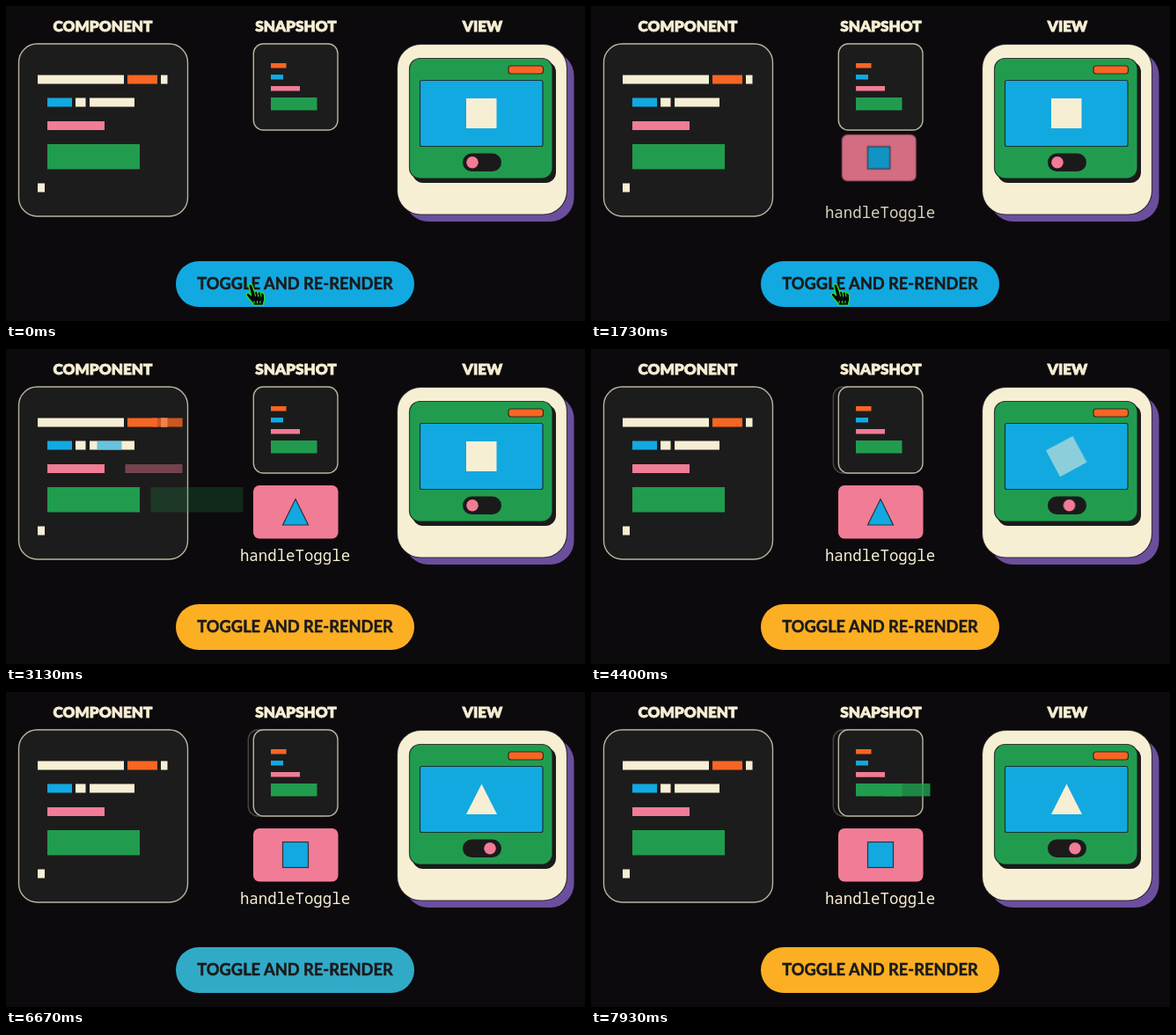
An HTML page for the animation above (8000 ms loop, 658x358 px).

```html
<!DOCTYPE html>
<html lang="en">
<head>
<meta charset="utf-8">
<title>Toggle and re-render</title>
<style>
  html, body { margin: 0; width: 100%; height: 100%; overflow: hidden; background: #0d0a0d; }
  svg { display: block; width: 658px; height: 358px; }
  svg * { transform-box: fill-box; transform-origin: center; }
  .cream { fill: #f7efd4; }
  .orange { fill: #f86624; }
  .blue { fill: #12a9e1; }
  .pink { fill: #f17c95; }
  .green { fill: #219c4e; }
  .purple { fill: #6b4f9e; }
  .dark { fill: #1b1a1b; }
  .card { fill: #1d1c1c; stroke: #b9b49f; stroke-width: 1.4; }
  .edge { stroke: #1b1a1b; stroke-opacity: .8; stroke-width: 1.2; }
  .head { font: 900 17.1px Lato, sans-serif; text-anchor: middle; stroke: #f7efd4; stroke-width: .8; }
  .label { font: 700 18.3px Lato, sans-serif; text-anchor: middle; stroke: #1b1a1b; stroke-width: .5; }
  .code { font: 17.4px "Noto Sans Mono", monospace; text-anchor: middle; }
  .cursor { fill: #050505; stroke: #2bdc35; stroke-width: 1.4; stroke-linejoin: round; }
</style>
</head>
<body>
<svg viewBox="0 0 658 358">
  <g class="head cream">
    <text x="110" y="29">COMPONENT</text>
    <text x="329.5" y="29">SNAPSHOT</text>
    <text x="541.5" y="29">VIEW</text>
  </g>

  <rect class="card" x="14.5" y="43" width="192" height="196" rx="21"/>
  <g id="code"></g>
  <rect id="flash" class="purple" x="14" y="42.500" width="193" height="197" rx="21"/>
  <g id="codeFly"></g>

  <g id="handler">
    <rect class="pink" x="281" y="155" width="96.500" height="60.500" rx="7"/>
    <rect id="stateSquare" class="blue edge" x="314.500" y="170.500" width="29" height="29"/>
    <path id="stateTriangle" class="blue edge" d="M329 170.500L343.500 200H314.500z"/>
  </g>
  <text id="handlerName" class="code cream" x="328.500" y="241">handleToggle</text>

  <g id="oldSnap"></g>
  <g id="snap"></g>

  <rect class="purple" x="453" y="52" width="192.500" height="193" rx="27"/>
  <rect class="cream edge" x="444.500" y="43.500" width="193" height="193.500" rx="27"/>
  <rect class="dark" x="462" y="63" width="163" height="138" rx="12"/>
  <rect class="green edge" x="458.500" y="59.500" width="162.500" height="136.500" rx="12"/>
  <rect class="orange edge" x="571" y="68" width="39.500" height="9" rx="3"/>
  <rect class="blue edge" x="470.500" y="84.500" width="139.500" height="75" rx="2"/>
  <rect id="viewSquare" class="cream" x="523" y="105" width="34.500" height="34"/>
  <path id="viewTriangle" class="cream" d="M540.500 104.500L558 139H523z"/>
  <rect class="dark" x="519" y="167.500" width="44" height="20.500" rx="10.250"/>
  <circle id="knob" class="pink" cx="530" cy="177.800" r="6.800"/>
  <g id="snapFly"></g>

  <rect id="button" x="193" y="290" width="271" height="52" rx="26"/>
  <text class="label dark" x="328.500" y="322">TOGGLE AND RE-RENDER</text>

  <path id="arrow" class="cursor" d="M296 281V302L301 298L304.500 306L308.500 304L305 296.500H312z"/>
  <g id="hand" class="cursor">
    <path d="M276 319c-1-3.500 3-4 4 -1l2.500 7c1-1.600 3-1 3.500.5c1-1.500 3-1 3.500.7c1.500-1 3.500 0 4 2l.3 5c0 2.500-1.300 3.500-1.300 7h-11c-.5-3-3-4.500-5-7l-3-4c-1-2.500 1.500-4 3.500-2l1.500 1.500z"/>
    <path d="M282.500 325l1 5M286 325.500l.7 5M289.500 326.500l.5 4M282 335v3M285.500 335v3M289 335v3" stroke-width="1.100"/>
  </g>
</svg>
<script>
const LOOP = 8000, SPAN = 9000;
const $ = id => document.getElementById(id);
const tracks = [];

// Steps are [time, style]; the ends hold the first and last style.
function play(node, steps, easing = 'ease-in-out') {
  const all = [[0, steps[0][1]], ...steps, [SPAN, steps.at(-1)[1]]];
  const frames = all.map(([time, style]) => ({ ...style, offset: time / SPAN, easing }));
  const track = node.animate(frames, { duration: SPAN, fill: 'both' });
  track.pause();
  tracks.push(track);
}

function add(parent, tag, attrs) {
  const node = document.createElementNS('http://www.w3.org/2000/svg', tag);
  for (const name in attrs) node.setAttribute(name, attrs[name]);
  return parent.appendChild(node);
}

const block = (parent, [kind, x, y, width, height]) =>
  add(parent, 'rect', { class: kind, x, y, width, height });

const codeBlocks = [
  ['green', 47, 157, 105, 28.5], ['pink', 47, 131, 65, 10],
  ['blue', 47, 104.5, 28, 10], ['orange', 138, 78.5, 34, 10],
  ['cream', 36, 78.5, 98, 10], ['cream', 176, 78.5, 7.5, 10],
  ['cream', 79, 104.5, 11.5, 10], ['cream', 95, 104.5, 51, 10],
  ['cream', 36, 201.5, 8, 10]
];
const snapBlocks = [
  ['green', 301, 104, 52.5, 14.5], ['pink', 301, 91, 33, 5.5],
  ['blue', 301, 78, 14, 5.5], ['orange', 301, 65, 17.5, 5.5]
];

codeBlocks.forEach(b => block($('code'), b));
for (const id of ['oldSnap', 'snap']) {
  add($(id), 'rect', { class: 'card', x: 281.3, y: 43, width: 95.7, height: 98, rx: 11 });
  snapBlocks.forEach(b => block($(id), b));
}

const look = (opacity, transform = 'none') => ({ opacity, transform });
const shift = x => `translate(${x}px, 0px)`;

// Copies of the coloured blocks leave one after another and fade.
function fly(parent, blocks, starts, distance, gap) {
  blocks.forEach((b, i) => {
    const steps = starts.flatMap(start => {
      const t = start + i * gap;
      return [[t, look(0, shift(0))], [t, look(1, shift(0))], [t + 400, look(0, shift(distance))]];
    });
    play(block(parent, b), steps);
  });
}
fly($('codeFly'), codeBlocks.slice(0, 4), [2860, 7100], 150, 50);
fly($('snapFly'), snapBlocks, [3580, 7820], 200, 110);

const on = look(1, 'rotate(0deg)');
const offLeft = look(0, 'rotate(-60deg)'), offRight = look(0, 'rotate(60deg)');
play($('stateSquare'), [[2050, on], [2350, offLeft], [6340, offLeft], [6560, on]], 'linear');
play($('stateTriangle'), [[2200, offRight], [2450, on], [6250, on], [6450, offRight]], 'linear');
play($('viewSquare'), [[4260, on], [4560, offLeft]], 'linear');
play($('viewTriangle'), [[4410, offRight], [4660, on]], 'linear');
play($('knob'), [[4280, { transform: shift(0) }], [4480, { transform: shift(20) }]]);

play($('handler'), [
  [1430, look(0, 'translate(-16px, -100px) scale(0)')],
  [1830, look(1, 'translate(0px, 0px) scale(1)')]
]);
play($('handlerName'), [[1430, look(0)], [1830, look(1)]]);

const flashes = [2500, 6740].flatMap(t =>
  [[t, look(0)], [t + 150, look(.86)], [t + 230, look(.86)], [t + 560, look(0)]]);
play($('flash'), flashes);

const renders = [3120, 7360];
play($('snap'), renders.flatMap(t => [
  [t, look(1, shift(0))], [t, look(0, shift(-24))], [t + 360, look(1, shift(0))]
]));
play($('oldSnap'), [[0, look(0, shift(0))], ...renders.flatMap((t, i) => [
  [t, i ? look(.35, shift(-6)) : look(0, shift(0))],
  [t, look(1, shift(0))], [t + 360, look(.35, shift(-6))]
])]);

const idle = { fill: '#fcaf23' }, hover = { fill: '#12a9e1' };
play($('button'), [
  [2420, hover], [2620, idle], [5735, idle], [5935, hover], [6620, hover], [6820, idle]
]);

const at = (x, y, opacity = 1) => look(opacity, `translate(${x}px, ${y}px)`);
play($('hand'), [
  [2340, at(0, 0)], [2450, at(8, 46)], [2450, at(8, 46, 0)],
  [5920, at(4, -8, 0)], [5920, at(4, -8)], [6010, at(0, 0)],
  [6520, at(0, 0)], [6620, at(8, 46)], [6620, at(8, 46, 0)]
], 'linear');
play($('arrow'), [
  [5730, at(-3, 36, 0)], [5730, at(-3, 36)], [5790, at(0, 0)],
  [5830, at(0, 0)], [5920, at(-14, 26)], [5920, at(-14, 26, 0)]
], 'linear');

const start = performance.now();
function tick() {
  const time = (performance.now() - start) % LOOP;
  for (const track of tracks) track.currentTime = time;
  requestAnimationFrame(tick);
}
tick();
</script>
</body>
</html>
```
